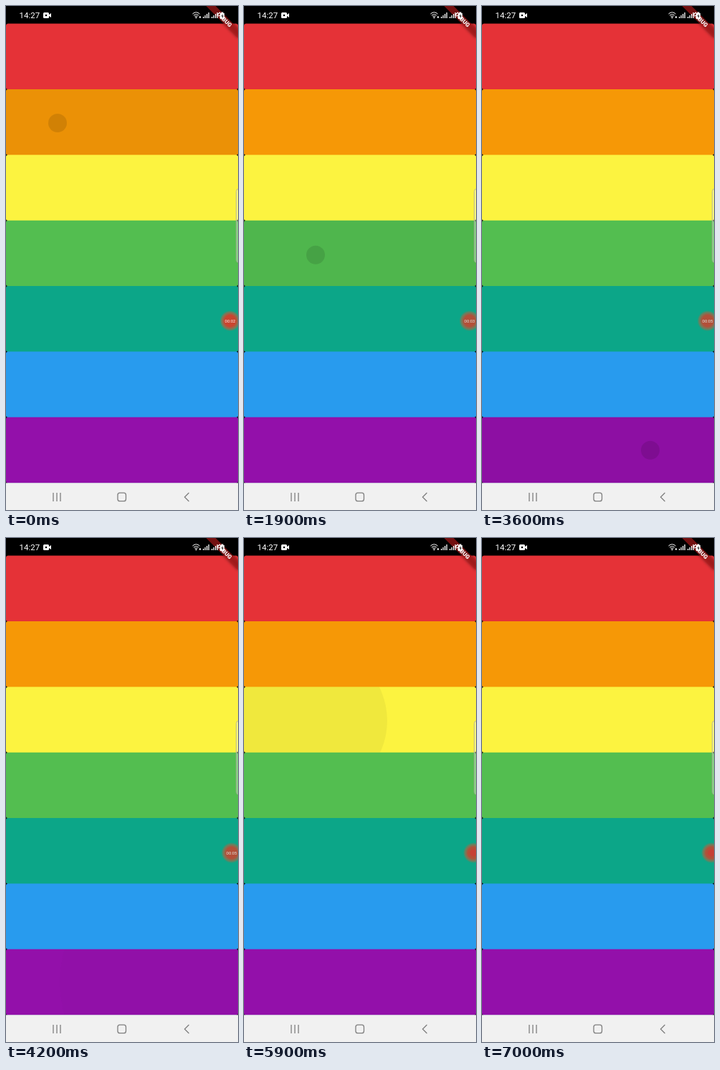
An HTML page that plays this animation: 324 by 702 pixels, repeating every 7.1 s.

```html
<!DOCTYPE html>
<html lang="en">
<head>
<meta charset="utf-8">
<title>Colour bars</title>
<style>
  html, body { margin: 0; width: 100%; height: 100%; overflow: hidden; background: #000; }
  svg { display: block; }
  text { font-family: Roboto, sans-serif; fill: #fff; }
</style>
</head>
<body>
<svg id="stage" width="324" height="702" viewBox="0 0 324 702">
  <defs>
    <radialGradient id="glow">
      <stop offset=".55" stop-color="#c9452f"/>
      <stop offset=".8" stop-color="#b8603f" stop-opacity=".65"/>
      <stop offset="1" stop-color="#b8603f" stop-opacity="0"/>
    </radialGradient>
    <filter id="blur" x="-20%" y="-100%" width="140%" height="300%"><feGaussianBlur stdDeviation="2"/></filter>
  </defs>
  <rect width="324" height="702"/>
  <g id="seams"></g>
  <g id="rows"></g>

  <!-- corner banner -->
  <g transform="translate(324 0) rotate(45)">
    <rect x="-31.5" y="22.1" width="63" height="9.4" opacity=".5" filter="url(#blur)"/>
    <rect x="-31.5" y="22.1" width="63" height="9.4" fill="#b71c1c" fill-opacity=".63"/>
    <text y="29.6" font-size="8" font-weight="900" text-anchor="middle">DEBUG</text>
  </g>

  <!-- status bar -->
  <text x="18.5" y="17" font-size="11.5">14:27</text>
  <g fill="#fff">
    <rect x="52" y="9" width="8" height="8" rx="1.5"/>
    <path d="M59.5 12.5L63 10v6l-3.5-2.5z"/>
    <circle cx="56" cy="13" r="1.3" fill="#000"/>
    <path d="M275 17v-2h1.3v2zM277.5 17v-4h1.3v4zM280 17v-6h1.3v6zM282.5 17v-8h1.3v8z"/>
    <path d="M287 17v-2h1.3v2zM289.5 17v-4h1.3v4zM292 17v-6h1.3v6zM294.5 17v-8h1.3v8z"/>
    <path d="M299 10h1.500v-1.500h3v1.500h1.500v8h-6z"/>
    <path d="M302.500 11l-2 3.500h1.500v2.500l2-3.500h-1.500z" fill="#333"/>
    <circle cx="265.5" cy="16.3" r="1"/>
    <circle cx="271" cy="15.5" r="1.2"/>
  </g>
  <path d="M260.5 11q5-4.500 10 0M262 13q3.500-3 7 0M263.5 14.800q2-1.800 4 0" fill="none" stroke="#fff"/>

  <!-- edge handle -->
  <rect x="321.5" y="254.5" width="12" height="103" rx="4" fill="#fff" fill-opacity=".3" stroke="#a9a99a" stroke-opacity=".75"/>

  <!-- recorder bubble -->
  <g id="bubble">
    <circle r="14.5" fill="url(#glow)"/>
    <circle id="mark" r="5" fill="#e0322a"/>
    <text id="timer" y="2.1" font-size="6" text-anchor="middle" opacity=".9"></text>
  </g>

  <!-- navigation bar -->
  <rect y="664.3" width="324" height="38" fill="#f1f1f1"/>
  <g fill="none" stroke="#7f7f7f" stroke-width="1.3">
    <path d="M66 678v12M71 678v12M76 678v12"/>
    <rect x="156" y="678.2" width="11.5" height="11.5" rx="3"/>
    <path d="M255.5 678l-6 6 6 6"/>
  </g>
</svg>
<script>
const LOOP = 7100, STEP = 100, TOP = 24.7, ROW = 91.35;
const colors = ['#e53237', '#f69806', '#fcf340', '#53be50', '#0ca688', '#289bee', '#9310aa'];

// row, x, y inside the row, press time, release time
const taps = [
  [1, 72, 47, -200, 500], [2, 78, 51, 950, 1300], [3, 100, 48, 1750, 2100],
  [4, 160, 46, 2350, 2480], [5, 227, 44, 2620, 2760], [6, 235, 46, 3400, 3920],
  [5, 230, 46, 4350, 4450], [4, 225, 46, 4680, 4780], [3, 150, 46, 5150, 5250],
  [2, 95, 47, 5620, 5730], [1, 85, 46, 6050, 6150], [0, 85, 46, 6610, 6640]
];

const byId = id => document.getElementById(id);
const clamp = v => Math.max(0, Math.min(1, v));

function add(parent, name, attrs) {
  const el = document.createElementNS('http://www.w3.org/2000/svg', name);
  for (const key in attrs) el.setAttribute(key, attrs[key]);
  return parent.appendChild(el);
}

// Square bands beneath the rounded rows leave black only at the corners.
const rows = colors.map((fill, i) => {
  const y = TOP + i * ROW;
  add(byId('seams'), 'rect', { x: 2, y, width: 320, height: 664.5 - y, fill });
  add(byId('rows'), 'rect', { y, width: 324, height: ROW, rx: 2.5, fill });
  return add(byId('rows'), 'svg', { y, width: 324, height: ROW, overflow: 'hidden' });
});

const inks = taps.map(([row, cx, cy, down, up]) => ({
  down, up,
  shade: add(rows[row], 'rect', { width: 324, height: ROW, rx: 2.5 }),
  spot: add(rows[row], 'circle', { cx, cy, r: 13 }),
  ripple: add(rows[row], 'circle', { cx, cy })
}));

function drawInk({ down, up, shade, spot, ripple }, t) {
  const since = t - up, held = t >= down && since < 0;
  const press = since < 0 ? clamp((t - down) / 100) : clamp(1 - since / 100);
  shade.setAttribute('opacity', 0.045 * press);
  spot.setAttribute('opacity', held ? 0.11 : 0);
  ripple.setAttribute('r', since > 0 ? 20 + since * 0.5 : 0);
  ripple.setAttribute('opacity', 0.057 * clamp((320 - since) / 180));
}

function drawBubble(t) {
  const x = 313 + 2 * clamp((t - 600) / 300) + 5.5 * clamp((t - 5400) / 400);
  const docked = t >= 5700;
  const seconds = 2 + [1000, 2300, 3400, 4600].filter(tick => t >= tick).length;
  byId('bubble').setAttribute('transform', `translate(${x} 438.5)`);
  byId('bubble').setAttribute('opacity', t < 600 ? 1 : 0.88);
  byId('mark').setAttribute('opacity', docked ? 1 : 0);
  byId('timer').textContent = docked ? '' : '00:0' + seconds;
}

const start = performance.now();
function frame() {
  const t = Math.floor((performance.now() - start) % LOOP / STEP) * STEP;
  inks.forEach(ink => drawInk(ink, t));
  drawBubble(t);
  requestAnimationFrame(frame);
}
frame();
</script>
</body>
</html>
```
